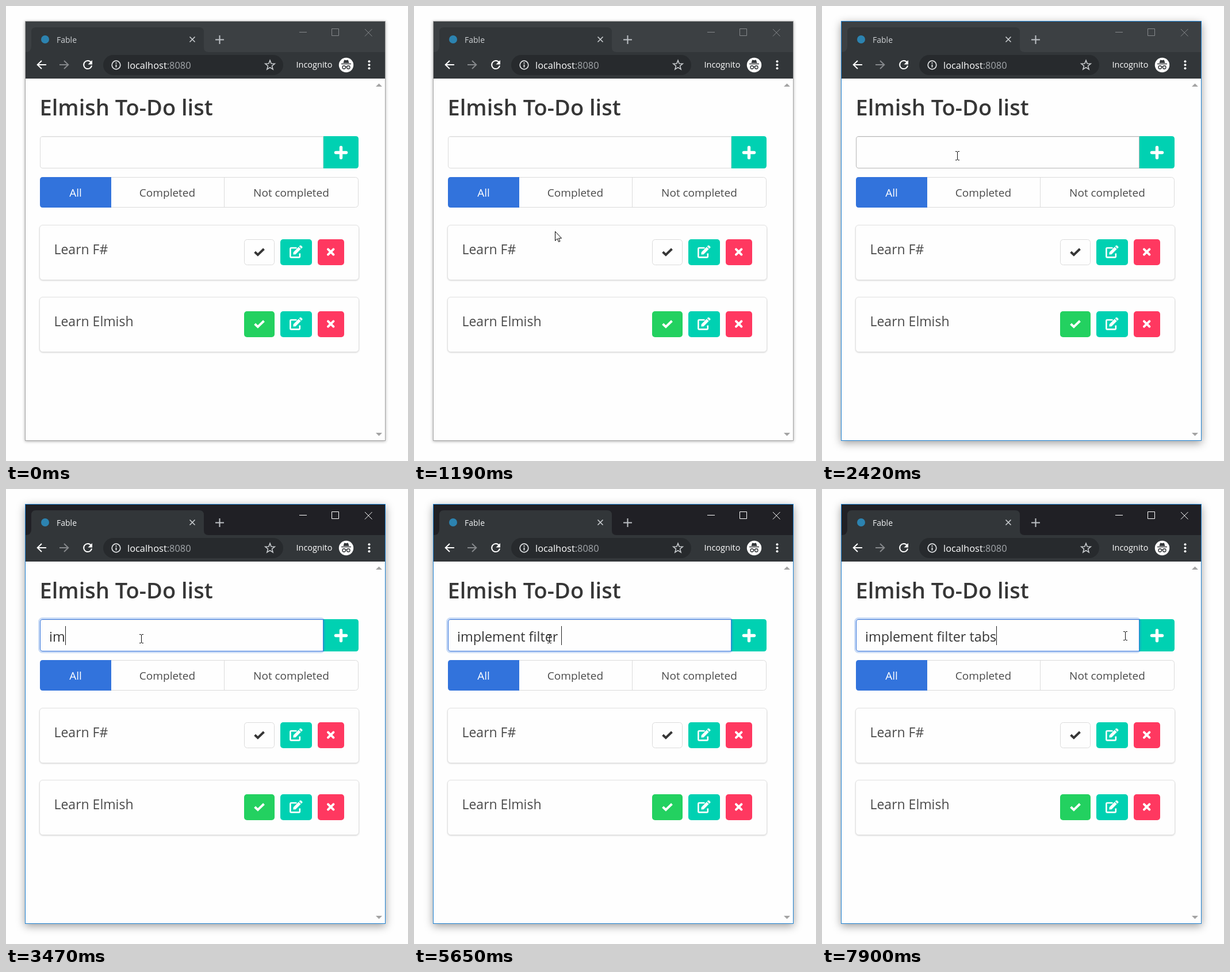
Recreate the animation shown at these times as an HTML page. Size 699x790 px, loop 8 s.

```html
<!DOCTYPE html>
<html lang="en">
<head>
<meta charset="utf-8">
<title>To-Do list</title>
<style>
html, body { margin: 0; width: 100%; height: 100%; overflow: hidden; background: #fefefe; }
#shadow { position: absolute; left: 33px; top: 26px; width: 627px; height: 729px;
  box-shadow: 0 1px 5px rgba(0,0,0,.32); }
.active #shadow { box-shadow: 0 4px 14px rgba(0,0,0,.38); }
svg { position: absolute; left: 0; top: 0; }
text { font-family: "Open Sans", "Noto Sans", sans-serif; fill: #4a4a4a; font-variant-ligatures: none; white-space: pre; }
.line { fill: none; stroke: #fff; stroke-width: 2; }
.icon { fill: none; stroke: #fff; stroke-width: 4; stroke-linecap: round; }
.frame { fill: none; stroke: rgba(0,0,0,.35); }
.active .frame { stroke: #1f82d2; }
.bar { fill: #3c4043; }
.focus .bar { fill: #202025; }
.title { fill: #cdd0d3; font-size: 14px; }
.focus .title { fill: #f1f3f4; }
.controls { fill: none; stroke: #85888b; }
.focus .controls { stroke: #fff; }
.field { fill: #fefefe; stroke: #dbdbdb; }
.over .field { stroke: #b5b5b5; }
.focus .field { stroke: #3273dc; }
.ring { display: none; fill: none; stroke: #3273dc; stroke-opacity: .25; stroke-width: 3; }
.focus .ring { display: block; }
.tab { font-size: 19px; text-anchor: middle; }
#hover { fill: #f3f3f3; stroke: #b5b5b5; }
.card { filter: drop-shadow(0 1.5px 1.2px rgba(10,10,10,.16)); }
.task { font-size: 23px; }
.pointer path { fill: #fff; stroke: #000; stroke-linejoin: round; }
</style>
</head>
<body>
<div id="shadow"></div>
<svg width="699" height="790" viewBox="0 0 699 790">
  <defs>
    <g id="edit">
      <path d="M1.5-7H-8Q-9.6-7-9.6-5.4V7.8Q-9.6 9.4-8 9.4H5.2Q6.8 9.4 6.8 7.8V2.5" class="line" style="stroke-width:2.6"/>
      <path d="M-4.6 4.6L-4.3.4 4.8-8.8 8.7-4.9-.4 4.2zM5.7-9.7L7-11Q8.2-12 9.2-11L11-9.2Q12-8 11-7L9.6-5.8z" fill="#fff"/>
    </g>
    <g id="row">
      <rect x="58.5" y=".5" width="555" height="95" rx="5.5" fill="#fefefe" stroke="#e2e2e2" class="card"/>
      <rect x="477" y="25" width="55" height="45" rx="5" fill="#00d1b2"/>
      <rect x="542" y="25" width="46" height="45" rx="5" fill="#ff3860"/>
      <use href="#edit" x="504" y="47"/>
      <path d="M560 42.3l9.4 9.4m0-9.4l-9.4 9.4" class="icon"/>
    </g>
    <path id="check" d="M432.6 47l5.3 5 10.6-10.2" style="stroke-linecap:butt"/>
  </defs>

  <rect x="34" y="27" width="625" height="727" fill="#fefefe"/>
  <rect x="34" y="27" width="625" height="53" class="bar"/>
  <path d="M34 80Q44 80 44 70V45Q44 37 52 37H336Q344 37 344 45V72Q344 80 352 80H659V126H34z" fill="#323639"/>
  <circle cx="68" cy="58" r="7" fill="#2c83b0"/>
  <text x="88" y="64" class="title">Fable</text>
  <path d="M319.5 53.5l9 9m0-9l-9 9" class="line" style="stroke:#c6c9cc;stroke-width:1.7"/>
  <path d="M364 58.5h15M371.5 51v15" class="line" style="stroke:#bdc1c6"/>
  <path class="controls" d="M510 45.5h13M566.5 39.5h12v12h-12zM624 40l12.5 12.5m0-12.5L624 52.5"/>

  <path d="M70 102H55m7-7l-7.3 7 7.3 7" class="line"/>
  <path d="M93 102h15m-7-7l7.3 7-7.3 7" class="line" style="stroke:#85888b"/>
  <path d="M148 98.2A7 7 0 1 0 149 103.5" class="line"/>
  <path d="M150 94v7.5h-7.5z" fill="#fff"/>
  <rect x="169" y="85" width="313" height="35" rx="17.5" fill="#272a2d"/>
  <circle cx="191.5" cy="102.5" r="7.3" class="line" style="stroke:#e0e2e4;stroke-width:1.7"/>
  <path d="M191.5 101.5v5M191.5 98v2" class="line" style="stroke:#e0e2e4"/>
  <text x="211" y="108.5" font-size="16.4" style="fill:#fff">localhost<tspan fill="#a4a8ac">:8080</tspan></text>
  <path id="star" class="line" style="stroke:#c8cbce;stroke-width:1.6"/>
  <text x="504.5" y="107" font-size="14.5" style="fill:#fff">Incognito</text>
  <circle cx="591.5" cy="102.5" r="12.7" fill="#fff"/>
  <path d="M583 101.3v-1.6h17v1.6zM586.5 99l1.7-5.6 3.3.8 3.3-.8 1.7 5.6z" fill="#34373a"/>
  <path d="M590.5 106q1-1 2 0" class="line" style="stroke:#34373a;stroke-width:1.3"/>
  <g class="line" style="stroke:#34373a;stroke-width:1.4"><circle cx="587.7" cy="106.5" r="2.7"/><circle cx="595.3" cy="106.5" r="2.7"/></g>
  <g fill="#fff"><circle cx="631.5" cy="96.3" r="2"/><circle cx="631.5" cy="102.3" r="2"/><circle cx="631.5" cy="108.3" r="2"/></g>
  <path d="M643 140l5.5-5.5 5.5 5.5zM643 741l5.5 5.5 5.5-5.5z" fill="#a3a3a3"/>

  <text x="58.5" y="190" font-size="38" font-weight="600" style="fill:#363636">Elmish To-Do list</text>

  <path d="M551 226H608Q613 226 613 231V277Q613 282 608 282H551z" fill="#00d1b2"/>
  <path d="M573.5 254.5h18M582.5 245.5v18" class="icon" style="stroke-width:5.4"/>
  <path d="M552 226.500H64Q59.500 226.500 59.500 231V277Q59.500 281.500 64 281.500H551.500V226.500" class="field"/>
  <path d="M63 227.500H551" stroke="#000" stroke-opacity=".06"/>
  <rect x="57.500" y="224.500" width="496" height="59" rx="6" class="ring"/>
  <text id="entry" x="75" y="265" font-size="23.4" style="fill:#363636"></text>
  <path id="caret" d="M.5 238v33" stroke="#222"/>

  <rect x="59.5" y="297.5" width="553" height="52" rx="5" fill="#fefefe" stroke="#dbdbdb"/>
  <path d="M379.5 298v51" stroke="#dbdbdb"/>
  <path d="M183 297H64Q59 297 59 302V345Q59 350 64 350H183z" fill="#3273dc"/>
  <rect id="hover" x="181.5" y="297.5" width="198" height="52"/>
  <text x="121" y="331" class="tab" style="fill:#fff">All</text>
  <text x="280.500" y="331" class="tab">Completed</text>
  <text x="496" y="331" class="tab">Not completed</text>

  <g transform="translate(0 380)">
    <use href="#row"/>
    <rect x="414.5" y="25.500" width="52" height="44" rx="5" fill="#fefefe" stroke="#dbdbdb"/>
    <use href="#check" class="icon" style="stroke:#363636"/>
    <text x="83.500" y="51" class="task">Learn F#</text>
  </g>
  <g transform="translate(0 505)">
    <use href="#row"/>
    <rect x="414" y="25" width="53" height="45" rx="5" fill="#23d160"/>
    <use href="#check" class="icon"/>
    <text x="83.500" y="51" class="task">Learn Elmish</text>
  </g>

  <rect x="33.500" y="26.500" width="626" height="728" class="frame"/>

  <g id="pointer" class="pointer">
    <path id="arrow" d="M.5.5V16.500L4.200 13 6.600 18.500 8.900 17.500 6.500 12.200H11.500z"/>
    <path id="hand" d="M-2 2C-2-.2 2-.2 2 2V7.500C2.500 6.300 5 6.500 5.200 8.200 6 7.200 7.800 7.600 8 9.200 9 8.500 10 9 10 10.800V15.500C10 18 8.800 19 8.800 22.500H0C0 19.500-1.500 18-3 15.800L-6.300 11.500C-7 10-5 8.800-3.600 10.300L-2 12zM2 7.500V12M5.200 8.200V12M8 9.200V12.500"/>
    <path id="beam" d="M-3-7.500H-1L.5-6.500 2-7.500H4M.5-6.500V6.500M-3 7.500H-1L.5 6.500 2 7.500H4" style="fill:none;stroke:#111"/>
  </g>
</svg>
<script>
const LOOP = 8000;
const phrase = "implement filter tabs";
const keyTimes = [3310, 3470, 3790, 4050, 4190, 4280, 4370, 4460, 4550, 4640,
  5000, 5110, 5270, 5360, 5460, 5560, 5650, 5910, 5990, 6150, 6190];
// time, x, y
const route = [
  [190, 557, 769], [560, 382, 584], [930, 260, 458], [1190, 245, 391], [1450, 240, 338],
  [1740, 237, 306], [1840, 237, 304], [2100, 235, 276], [2320, 235, 260], [6900, 235, 260],
  [7100, 275, 246], [7350, 355, 238], [7670, 480, 244], [7900, 527, 255]
];
const $ = id => document.getElementById(id);
const show = (id, on) => { $(id).style.display = on ? "" : "none"; };
const between = (v, a, b) => v >= a && v < b;

function position(t) {
  const i = route.findIndex(p => p[0] > t);
  if (i < 0) return route[route.length - 1].slice(1);
  if (i === 0) return route[0].slice(1);
  const [a, b] = [route[i - 1], route[i]];
  const k = (t - a[0]) / (b[0] - a[0]);
  return [1, 2].map(n => Math.round(a[n] + (b[n] - a[n]) * k));
}

function draw(t) {
  const [x, y] = position(t);
  const overTab = between(y, 297, 350);
  const overField = between(y, 226, 282);
  const focused = t >= 2520;
  const css = document.body.classList;
  css.toggle("active", t >= 2420);
  css.toggle("focus", focused);
  css.toggle("over", overField);

  show("pointer", t >= 190);
  $("pointer").setAttribute("transform", `translate(${x} ${y})`);
  show("hand", overTab);
  show("beam", overField);
  show("arrow", !overTab && !overField);
  show("hover", overTab);

  const typed = keyTimes.filter(k => k <= t).length;
  const entry = $("entry");
  entry.textContent = phrase.slice(0, typed).replace(/ /g, "\u00a0");
  const end = typed ? Math.round(75 + entry.getComputedTextLength()) : 75;
  $("caret").setAttribute("transform", `translate(${end} 0)`);
  show("caret", focused && !between(t, 3040, 3310) && !between(t, 6720, 7250));
}

const star = Array.from({ length: 10 }, (_, i) => {
  const r = i % 2 ? 3.7 : 8.6, a = i * Math.PI / 5;
  return (459 + r * Math.sin(a)).toFixed(1) + " " + (103 - r * Math.cos(a)).toFixed(1);
});
$("star").setAttribute("d", "M" + star.join("L") + "z");

const start = performance.now();
function tick() {
  draw((performance.now() - start) % LOOP);
  requestAnimationFrame(tick);
}
tick();
</script>
</body>
</html>
```
